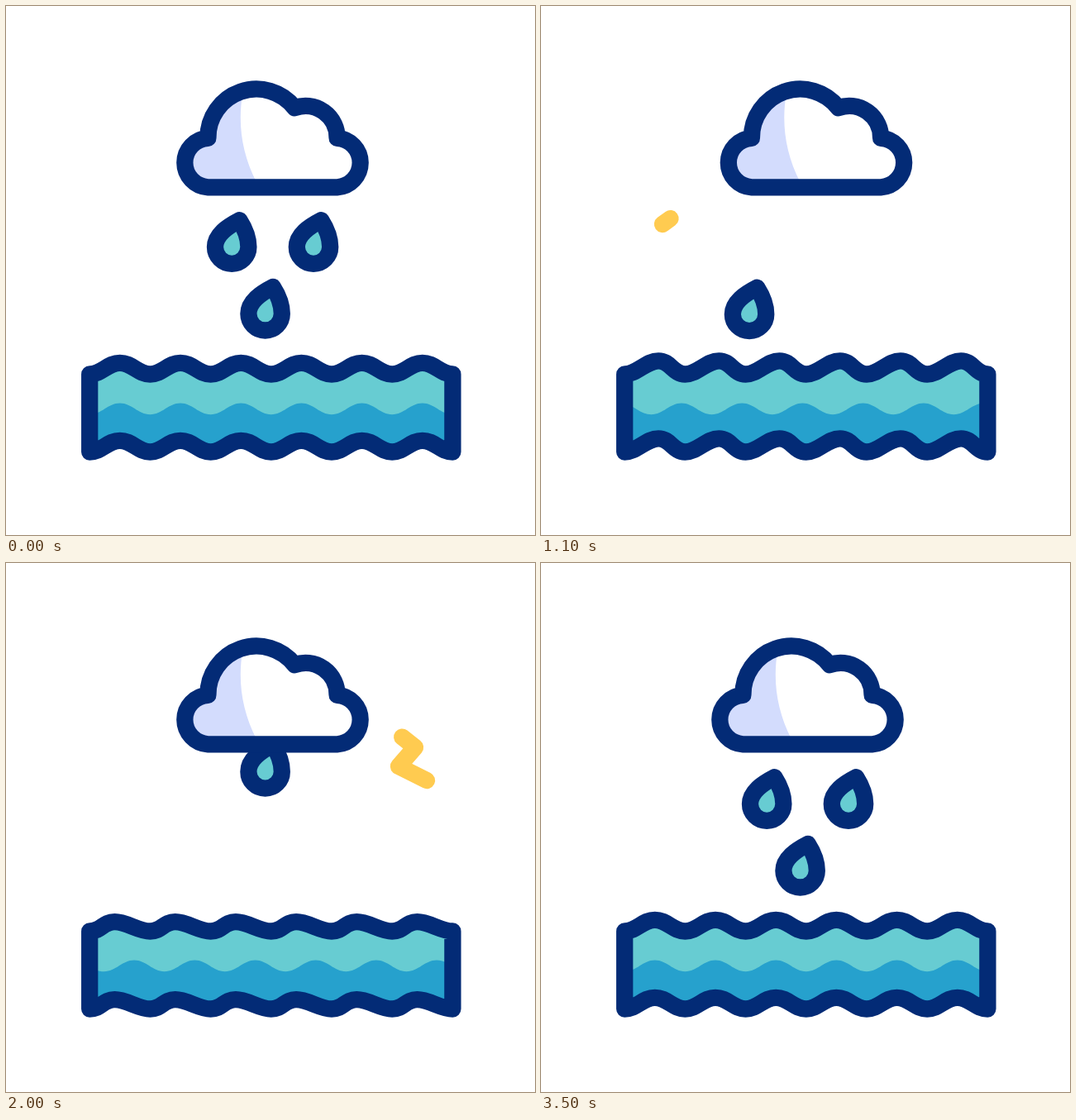
Write an HTML page with a canvas that moves like this. It is 640x640 px and loops after 3.6 s.

```html
<!DOCTYPE html>
<html lang="en">
<head>
<meta charset="utf-8">
<title>Rain and flood</title>
<style>
html, body { margin: 0; width: 100%; height: 100%; overflow: hidden; background: #fff; }
canvas { display: block; width: 640px; height: 640px; }
</style>
</head>
<body>
<canvas id="stage" width="640" height="640"></canvas>
<script>
const ctx = document.getElementById('stage').getContext('2d');
const LOOP = 3600;
const NAVY = '#032b76', CYAN = '#67ccd2', BLUE = '#26a1cd', SHADE = '#d3dcfd', YELLOW = '#ffcb50';

const ramp = (t, a, b) => Math.min(1, Math.max(0, (t - a) / (b - a)));
const ease = (t, a, b) => (1 - Math.cos(Math.PI * ramp(t, a, b))) / 2;

// Value of a [position, value] table at t
function track(t, keys, fn) {
  let v = keys[0][1];
  for (let i = 1; i < keys.length; i++) {
    const [a, va] = keys[i - 1], [b, vb] = keys[i];
    if (t >= a) v = va + (vb - va) * fn(t, a, b);
  }
  return v;
}

const cloud = new Path2D('M244.4 219.3A29.8 29.8 0 0 1 244.4 159.8A58.6 58.6 0 0 1 349.3 123.2' +
  'A38.3 38.3 0 0 1 400.6 159.8A29.8 29.8 0 0 1 400.6 219.3Z');
const shade = new Path2D('M286.5 105C280 141 285 178 303 213L303 225H200V90H288Z');

// Drop around the centre of its bowl
const drop = new Path2D('M9.3-32.4C-5-25-20.2-15-20.2 0A20.2 20.2 0 0 0 20.2 0C20.2-12 16-22 9.3-32.4Z');

// Rest place, sideways slope, fall and return times, return height, splash place and time
const drops = [
  { x: 273.2, y: 291.6, slope: -.26, fall: 643, dist: 190, back: [2120, 2660], rise: 90, sx: 238.5, st: 1490 },
  { x: 372, y: 291.6, slope: -.08, fall: 340, dist: 190, back: [2100, 2640], rise: 90, sx: 353, st: 1130 },
  { x: 313.6, y: 372.3, slope: -.23, fall: 180, dist: 100, back: [1800, 2330], rise: 175, sx: 306.7, st: 780 }
];
const STRETCH = [[0, 1], [.5, 1.08], [.65, 1], [.8, .85]];

const bolts = [
  { pts: [[202, 198], [168, 212], [187, 235], [147, 264]], lead: [460, 840], trail: [720, 1200] },
  { pts: [[462, 197], [495, 223], [475, 246], [509, 263]], lead: [1600, 1980], trail: [1860, 2340] }
];
for (const b of bolts) {
  b.path = new Path2D('M' + b.pts.join('L'));
  b.len = b.pts.slice(1).reduce((s, p, i) => s + Math.hypot(p[0] - b.pts[i][0], p[1] - b.pts[i][1]), 0);
}

const splash = [
  { path: new Path2D('M0 437V387'), len: 50 },
  { path: new Path2D('M-16 440Q-22 417-39 401.5'), len: 46 },
  { path: new Path2D('M16 440Q22 417 39 401.5'), len: 46 }
];

// Strokes the part of a path between two fractions of its length
function trim(path, len, from, to, color) {
  ctx.strokeStyle = color;
  ctx.setLineDash([Math.max(.01, (to - from) * len), 9999]);
  ctx.lineDashOffset = -from * len;
  ctx.stroke(path);
  ctx.setLineDash([]);
}

function outline(path, fill) {
  ctx.fillStyle = fill;
  ctx.fill(path);
  ctx.strokeStyle = NAVY;
  ctx.stroke(path);
}

// Adds a wave from trough to trough; the crests lean by dx and dy
const PERIOD = 73.2, LEFT = 101.2, RIGHT = LEFT + 6 * PERIOD;
function wave(path, x, y, count, dx, dy, dir = 1) {
  const h = 14.6 * dir;
  let px = x, py = y;
  path.lineTo(px, py);
  for (let i = 1; i <= count * 2; i++) {
    const crest = i % 2;
    const nx = x + dir * i * PERIOD / 2 + (crest ? dx : 0);
    const ny = y - (crest ? 13.7 - dy : 0);
    path.bezierCurveTo(px + h, py, nx - h, ny, nx, ny);
    px = nx;
    py = ny;
  }
}

function drawBolts(t) {
  for (const b of bolts) {
    if (t < b.lead[0] || t > b.trail[1] + 10) continue;
    trim(b.path, b.len, ease(t, ...b.trail), ease(t, ...b.lead), YELLOW);
  }
}

function drawSplash(d, t) {
  const s = d.st;
  if (t < s || t > s + 330) return;
  ctx.save();
  ctx.translate(d.sx, 0);
  for (const p of splash) trim(p.path, p.len, ease(t, s + 30, s + 310), ease(t, s, s + 280), BLUE);
  ctx.restore();
}

function drawDrop(d, t) {
  let dy, scale = 1;
  if (t < d.back[0]) {
    const u = ramp(t, d.fall, d.fall + 700);
    if (u === 1) return;
    dy = d.dist * u * u;
    scale = track(u, STRETCH, ramp);
  } else {
    dy = -d.rise * (1 - ease(t, ...d.back));
  }
  ctx.save();
  ctx.translate(d.x + Math.max(0, dy) * d.slope, d.y + dy);
  ctx.scale(1, scale);
  outline(drop, CYAN);
  ctx.restore();
}

function drawCloud(t) {
  ctx.save();
  ctx.translate(track(t, [[180, 0], [760, 10.5], [1200, 10.5], [1930, 0]], ease), 0);
  ctx.fillStyle = '#fff';
  ctx.fill(cloud);
  ctx.save();
  ctx.clip(cloud);
  ctx.fillStyle = SHADE;
  ctx.fill(shade);
  ctx.restore();
  ctx.strokeStyle = NAVY;
  ctx.stroke(cloud);
  ctx.restore();
}

function drawWater(t) {
  const lean = track(t, [[180, 0], [860, 1], [1750, -1], [2700, 0]], ease);
  const dx = lean * (lean > 0 ? 6.5 : 7.5), dy = -lean * (lean > 0 ? 3.8 : 2.8);
  const body = new Path2D();
  wave(body, LEFT, 445.5, 6, dx, dy);
  wave(body, RIGHT, 539.5, 6, dx, dy, -1);
  body.closePath();
  ctx.fillStyle = CYAN;
  ctx.fill(body);

  const shift = 3 * PERIOD * ease(t, 160, 3470);
  const deep = new Path2D();
  deep.moveTo(0, 560);
  wave(deep, LEFT - shift % PERIOD, 494.3, 7, 0, 0);
  deep.lineTo(640, 560);
  ctx.save();
  ctx.clip(body);
  ctx.fillStyle = BLUE;
  ctx.fill(deep);
  ctx.restore();

  ctx.strokeStyle = NAVY;
  ctx.stroke(body);
}

function draw(t) {
  ctx.clearRect(0, 0, 640, 640);
  ctx.lineWidth = 20.3;
  ctx.lineCap = ctx.lineJoin = 'round';
  drawBolts(t);
  for (const d of drops) drawSplash(d, t);
  for (const d of drops) drawDrop(d, t);
  drawCloud(t);
  drawWater(t);
}

const start = performance.now();
function tick() {
  draw((performance.now() - start) % LOOP);
  requestAnimationFrame(tick);
}
tick();
</script>
</body>
</html>
```
